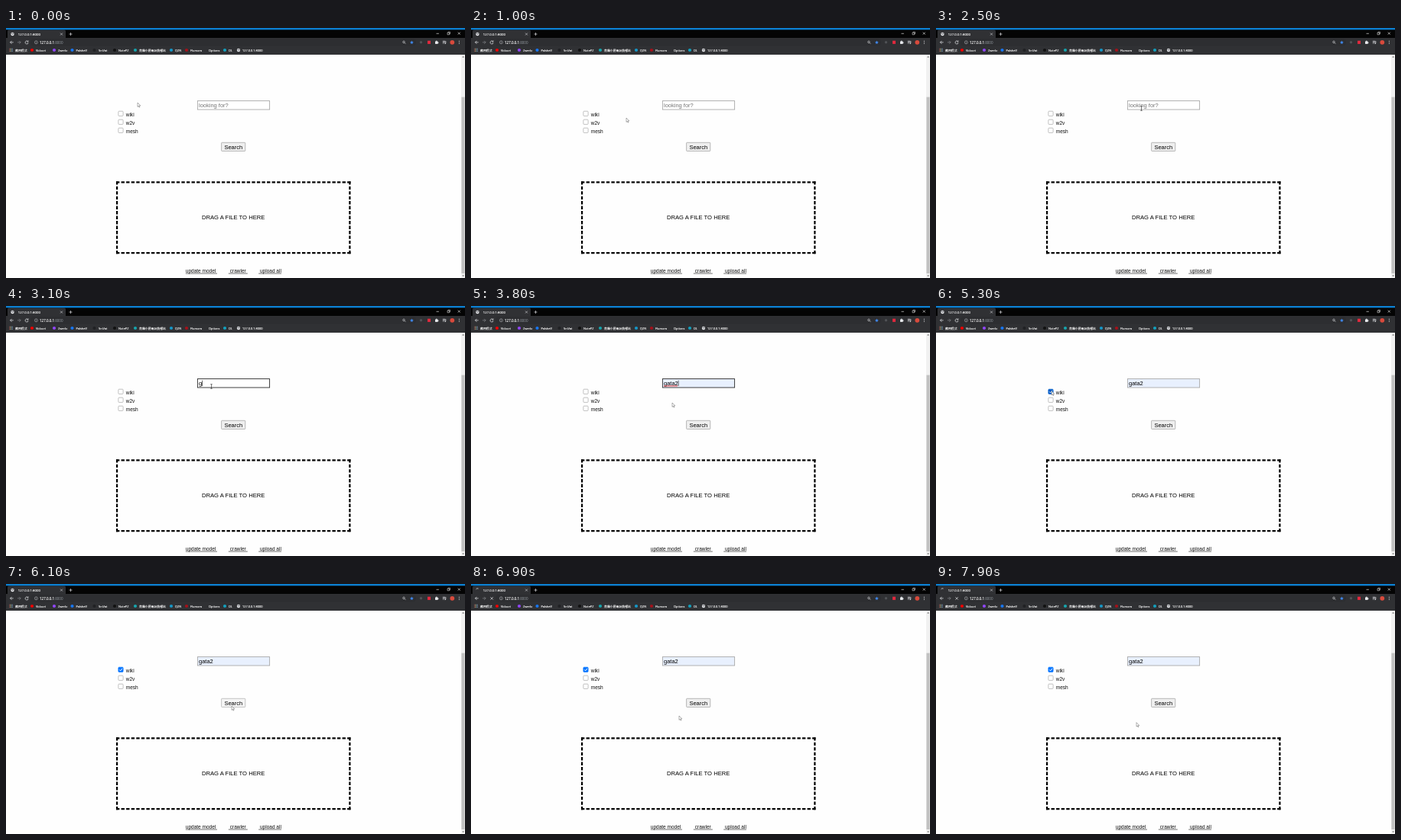
An HTML page for the animation above (8000 ms loop, 600 px wide and 328 px high).

```html
<!DOCTYPE html>
<html lang="en">
<head>
<meta charset="utf-8">
<title>Search page</title>
<style>
  html, body { margin: 0; width: 100%; height: 100%; overflow: hidden; background: #fefefe; }
  svg { display: block; width: 100vw; height: 100vh; }
  text { white-space: pre; }
  .page { font-family: "Liberation Sans", Arial, sans-serif; }
  .ui { font-family: "Open Sans", "Noto Sans CJK TC", "Noto Sans CJK", sans-serif; stroke: #fff; stroke-width: .12px; }
</style>
</head>
<body>
<svg id="stage" viewBox="0 0 600 328"></svg>
<script>
const LOOP = 8000, STEP = 100;
const BAR = '#303134', EDGE = '#a8a8a8', EDGE_HOVER = '#808080';
const stage = document.getElementById('stage');

function add(tag, attrs, text) {
  const el = document.createElementNS('http://www.w3.org/2000/svg', tag);
  set(el, attrs);
  if (text !== undefined) el.textContent = text;
  return stage.appendChild(el);
}
function set(el, attrs) {
  for (const k in attrs) el.setAttribute(k, attrs[k]);
}
const rect = (x, y, width, height, fill, more) => add('rect', { x, y, width, height, fill, ...more });
const dot = (cx, cy, r, fill, more) => add('circle', { cx, cy, r, fill, ...more });
const line = (d, stroke, width = 0.7, more) =>
  add('path', { d, stroke, 'stroke-width': width, fill: 'none', ...more });
const label = (x, y, size, text, fill, cls = 'page') =>
  add('text', { x, y, 'font-size': size, fill, class: cls }, text);
const show = (el, on) => el.setAttribute('visibility', on ? 'visible' : 'hidden');

function globe(x, y) {
  dot(x, y, 2.2, '#e8eaed');
  line(`M${x - 1.6} ${y - .9}l1.4 .5l.3 1.3M${x + .6} ${y - 1.7}l.2 1.2l1 .4`, '#45464a', 0.7);
}

// Browser frame
rect(0, 0, 600, 35, BAR);
rect(0, 0, 600, 13, '#040404');
rect(2, 2.5, 76, 12, BAR, { rx: 2 });
rect(0, 0, 600, 2.3, '#0c7fd0');
label(15.8, 9.8, 4.3, '127.0.0.1:8000', '#fff', 'ui');
line('M71 6.5l3 3m0 -3l-3 3', '#dadce0', 0.6);
line('M82.5 8h4M84.5 6v4', '#dadce0', 0.7);
line('M562.5 7.3h3.4', '#fff', 0.6);
line('M577 6.2h2.5v2.5h-2.5zM577.9 6v-.8h2.6v2.6h-.8', '#fff', 0.5);
line('M590.8 5.6l3 3m0 -3l-3 3', '#fff', 0.6);

// Toolbar
rect(32, 14, 504, 9.6, '#2d2e31', { rx: 4.8 });
line('M9.7 18.8h-4.2M7.5 16.8l-2 2l2 2', '#e8eaed');
line('M15 18.8h4.2M17.2 16.8l2 2l-2 2', '#85878b');
const reload = line('M28.6 17.6a2 2 0 1 0 .5 1.6M29 16.4v1.6h-1.6', '#e8eaed');
const stop = line('M25.5 17.2l3.4 3.4m0 -3.4l-3.4 3.4', '#e8eaed');
dot(39.4, 18.8, 2, 'none', { stroke: '#c4c7ca', 'stroke-width': 0.5 });
line('M39.4 18.5v1.3M39.4 17.6v.4', '#c4c7ca', 0.5);
const url = label(44, 20.6, 4.5, '127.0.0.1', '#fff', 'ui');
url.appendChild(add('tspan', { fill: '#9aa0a6', stroke: 'none' }, ':8000'));
dot(520, 18.4, 1.3, 'none', { stroke: '#e8eaed', 'stroke-width': 0.6 });
line('M521 19.4l1.3 1.3', '#e8eaed');
add('path', { d: 'M530.4 16.4l.7 1.6l1.7 .2l-1.3 1.2l.4 1.7l-1.5 -.9l-1.5 .9l.4 -1.7l-1.3 -1.2l1.7 -.2z', fill: '#3f86e8' });
dot(542.5, 18.8, 1.7, '#505256');
rect(551, 16.7, 4, 4.2, '#e0293d');
rect(561, 17.5, 3.6, 3.4, '#e8eaed');
dot(562.8, 17.3, 0.8, '#e8eaed');
dot(564.8, 19.2, 0.8, '#e8eaed');
line('M570.8 17.2h3.4M570.8 18.6h3.4M570.8 20h1.8M574.8 17v3', '#e8eaed');
dot(574.2, 20.2, 0.8, '#e8eaed');
dot(583.3, 18.8, 2.9, '#d84a3c');
for (const y of [17, 18.8, 20.6]) dot(592.3, y, 0.5, '#e8eaed');

// Bookmarks: text, text x, icon colour, icon x
for (let i = 0; i < 9; i++)
  rect(4.5 + i % 3 * 1.6, 26.7 + Math.floor(i / 3) * 1.6, 1.1, 1.1, ['#c87460', '#80a880', '#7893c0'][i % 3]);
const marks = [
  ['應用程式', 12],
  ['Vidoori', 39, '#f00000', 34],
  ['Zwerlo', 68, '#9146ff', 63],
  ['Palshelf', 91.5, '#1877f2', 86.5],
  ['SrcVat', 121, '#202124', 115.5],
  ['NotePZ', 147, '#111', 142],
  ['青藤小屋電玩情報站', 174, '#16a5ad', 169],
  ['QZN', 221, '#1698c8', 216],
  ['Flumora', 241, '#a5111a', 236],
  ['Options', 265],
  ['DL', 291, '#12a0bd', 286],
  ['127.0.0.1:8000', 309]
];
for (const [text, x, color, cx] of marks) {
  label(x, 30.7, 3.9, text, '#fff', 'ui');
  if (color) dot(cx, 29, 2.1, color);
}
globe(304, 29);

// Scrollbar
rect(595, 35, 5, 293, '#f1f1f1');
rect(595.4, 90.6, 4.2, 231.4, '#c1c1c1');
add('path', { d: 'M596.3 38.6l1.3 -1.5l1.3 1.5z', fill: '#505050' });
add('path', { d: 'M596.3 324.4l1.3 1.5l1.3 -1.5z', fill: '#505050' });

// Search form
const field = rect(250.4, 95.6, 94.2, 11.4, '#fff', { 'stroke-width': 0.9 });
const entry = label(252, 103.7, 7.5, '', '#000');
const caret = rect(252, 97.6, 0.6, 7.4, '#000');
const squiggle = line('', '#e83030', 0.9);

const boxes = ['wiki', 'w2v', 'mesh'].map((name, i) => {
  const y = 109.2 + i * 11;
  label(156.7, y + 6.7, 6.55, name, '#111');
  return rect(146.9, y, 6.2, 6.2, '#fff', { rx: 0.9, 'stroke-width': 0.7 });
});
const tick = line('M148.2 112.4l1.4 1.5l2.5 -3.1', '#fff', 1);

const button = rect(281.6, 150.3, 31.2, 11.2, '#efefef', { rx: 0.7, 'stroke-width': 0.8 });
label(285.4, 158.6, 7.5, 'Search', '#000');

// Drop zone: each side is dashed from corner to corner
const W = 2.19;
function dashed(x1, y1, x2, y2) {
  const len = Math.hypot(x2 - x1, y2 - y1);
  const count = Math.round((len + W) / (3 * W));
  const gap = (len - count * 2 * W) / (count - 1);
  line(`M${x1} ${y1}L${x2} ${y2}`, '#000', W, { 'stroke-dasharray': `${2 * W} ${gap}` });
}
const L = 144, R = 450.5, T = 201.2, B = 296.3, H = W / 2;
dashed(L, T + H, R, T + H);
dashed(L, B - H, R, B - H);
dashed(L + H, T, L + H, B);
dashed(R - H, T, R - H, B);
label(256, 251.3, 7.63, 'DRAG A FILE TO HERE', '#000');

const link = (x, text, from, to) => {
  label(x, 321, 6.5, text, '#111');
  line(`M${from} 322.1H${to}`, '#111', 0.6);
};
link(234.8, 'update model', 234.8, 276);
link(292.8, 'crawler', 290.8, 315.8);
link(332, 'upload all', 330.2, 360);

// Tab icon and spinner
globe(8.5, 8);
const cover = rect(5.5, 5, 6, 6, BAR);
const spinner = line('M8.5 5.8A2.2 2.2 0 0 1 10.7 8', '#c8cbd0', 0.8);

// Pointers
const arrow = add('path', {
  d: 'M0 0V17L4 13.2L6.6 19.2L9 18.2L6.4 12.3H12Z',
  fill: '#fff', stroke: '#333', 'stroke-width': 1.2
});
const beam = line('M-1.3 -2.8h2.6M0 -2.8v5.6M-1.3 2.8h2.6', '#222', 0.6);

// Pointer path: time, x, y
const path = [
  [0, 172, 98], [500, 198, 115], [700, 198, 115], [1000, 203, 118], [1400, 203, 118],
  [2300, 275, 83], [2500, 268.5, 105.5], [3400, 268.5, 105.5], [3800, 263, 127],
  [4200, 232, 129], [4700, 155, 115], [4900, 151, 111.5], [5300, 151, 111.5],
  [5700, 295, 160], [6200, 295, 160], [6900, 272, 173], [7800, 262, 181.7], [8000, 262, 181.7]
];
function pointer(t) {
  const i = path.findIndex(p => p[0] > t);
  const [t0, x0, y0] = path[i - 1], [t1, x1, y1] = path[i];
  const k = (t - t0) / (t1 - t0);
  return [x0 + (x1 - x0) * k, y0 + (y1 - y0) * k];
}
const inside = (x, y, l, t, r, b) => x >= l && x <= r && y >= t && y <= b;

const FOCUS = 2800, TYPE = 3000, KEY = 150, CHECK = 5000, PRESS = 6100, LOAD = 6200;
const WORD = 'gata2';

function draw(now) {
  const t = Math.floor(now % LOOP / STEP) * STEP;
  const [x, y] = pointer(t);

  const focused = t >= FOCUS && t < CHECK;
  const typed = t < TYPE ? '' : WORD.slice(0, 1 + Math.floor((t - TYPE) / KEY));
  const full = typed === WORD;
  entry.textContent = typed || 'looking for?';
  set(entry, { fill: typed ? '#000' : '#757575' });
  set(field, {
    fill: full ? '#e8f0fe' : '#fff',
    stroke: focused ? '#2a2a2a' : EDGE
  });
  const end = 252 + (typed ? entry.getComputedTextLength() : 0);
  set(caret, { x: end });
  show(caret, focused && (t < 3600 || (t - 3600) % 1000 < 500));
  let wave = 'M252 105.1';
  for (let n = 0; 252 + n < end - 1; n++) wave += `l1 ${n % 2 ? 0.3 : -0.3}`;
  set(squiggle, { d: wave });
  show(squiggle, focused && full);

  const checked = t >= CHECK;
  boxes.forEach((box, i) => {
    const top = 109.2 + i * 11;
    const hover = inside(x, y, 146.5, top, 153.5, top + 6.2);
    const on = checked && i === 0;
    const blue = hover ? '#005cc8' : '#0075ff';
    set(box, { fill: on ? blue : '#fff', stroke: on ? blue : hover ? EDGE_HOVER : EDGE });
  });
  show(tick, checked);

  const over = inside(x, y, 281, 150, 313, 162);
  const pressed = t >= PRESS && t < LOAD;
  set(button, {
    fill: pressed ? '#f5f5f5' : over ? '#e5e5e5' : '#efefef',
    stroke: pressed ? '#b8b8b8' : over ? EDGE_HOVER : EDGE
  });

  const loading = t >= LOAD;
  show(reload, !loading);
  show(stop, loading);
  show(cover, loading);
  show(spinner, loading);
  set(spinner, { transform: `rotate(${-(t - 7900) * 0.36 - 60} 8.5 8)` });

  const text = inside(x, y, 250, 95.5, 345, 107.5);
  show(arrow, !text);
  show(beam, text);
  set(arrow, { transform: `translate(${x} ${y}) scale(.32)` });
  set(beam, { transform: `translate(${x} ${y})` });
}

const start = performance.now();
function loop() {
  draw(performance.now() - start);
  requestAnimationFrame(loop);
}
loop();
</script>
</body>
</html>
```
